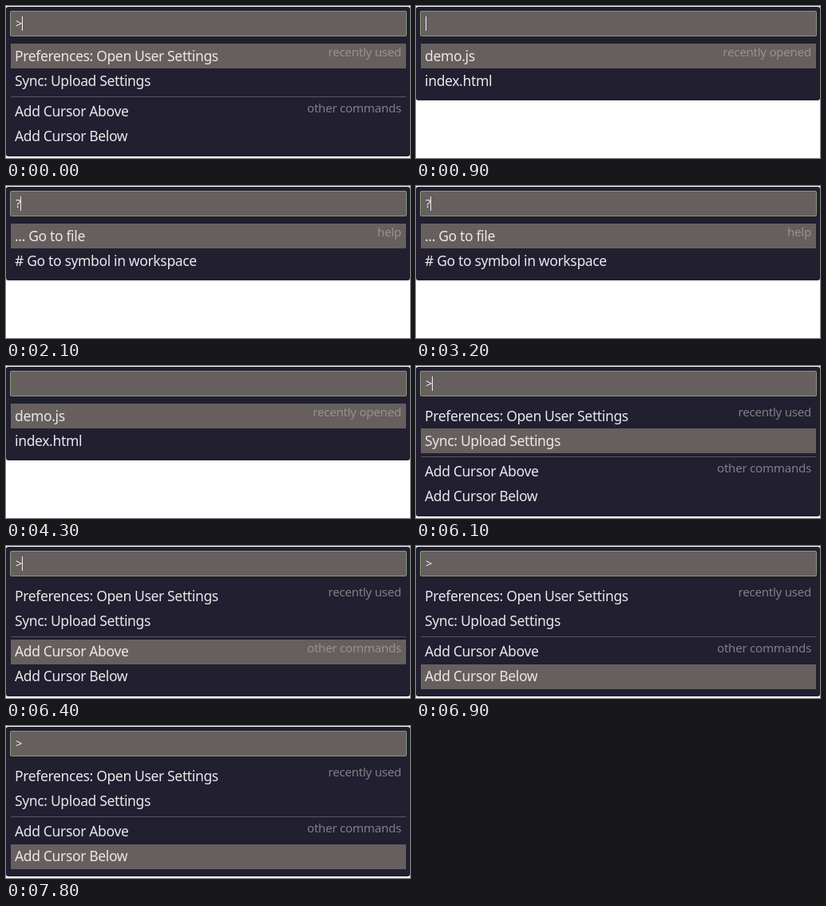
Animation, 506 px wide and 190 px high, one loop 8000 ms. Source, as an HTML page:

```html
<!DOCTYPE html>
<html lang="en">
<head>
<meta charset="utf-8">
<title>Command palette</title>
<style>
  html, body { margin: 0; width: 100%; height: 100%; overflow: hidden; background: #fff; }
  svg { display: block; font-family: "Noto Sans", "Open Sans", sans-serif; }
  .panel { fill: #211f30; }
  .input { fill: #665f5e; stroke: #879c75; }
  .caret, .typed { fill: #f0f0f0; }
  .typed { font-size: 14.6px; }
  .selected { fill: #665f5e; }
  .item { fill: #e8e8e8; font-size: 17.5px; letter-spacing: -.02em; }
  .group { fill: #a8a8a4; fill-opacity: .7; font-size: 15.2px; letter-spacing: -.02em; text-anchor: end; }
  .rule { fill: #57555f; }
</style>
</head>
<body>
<svg id="stage" width="506" height="190" viewBox="0 0 506 190"></svg>
<script>
const LOOP = 8000;
const ROW_TOPS = [47, 78, 117, 148];
const BASELINES = [69, 100, 138, 169];

const VIEWS = {
  commands: {
    typed: '>', caretX: 20, bottom: 188,
    items: ['Preferences: Open User Settings', 'Sync: Upload Settings', 'Add Cursor Above', 'Add Cursor Below'],
    groups: { 0: 'recently used', 2: 'other commands' }
  },
  files: {
    typed: '', caretX: 12, bottom: 118,
    items: ['demo.js', 'index.html'],
    groups: { 0: 'recently opened' }
  },
  help: {
    typed: '?', caretX: 18, bottom: 118,
    items: ['... Go to file', '# Go to symbol in workspace'],
    groups: { 0: 'help' }
  }
};

// Start time, view, selected row
const STEPS = [
  [0, 'commands', 0], [900, 'files', 0], [2100, 'help', 0], [3600, 'files', 0],
  [4800, 'commands', 0], [6100, 'commands', 1], [6400, 'commands', 2], [6900, 'commands', 3]
];

// Spans in which the caret is visible
const CARET_ON = [[0, 400], [900, 1600], [2100, 2700], [3200, 4300], [4800, 5400], [6100, 6700], [7200, 7800]];

const rect = (cls, x, y, w, h, rx = 0) =>
  `<rect class="${cls}" x="${x}" y="${y}" width="${w}" height="${h}" rx="${rx}"/>`;
const text = (cls, x, y, s) =>
  `<text class="${cls}" x="${x}" y="${y}">${s.replace('>', '&gt;')}</text>`;

function render(t) {
  const [, name, selected] = STEPS.findLast(step => step[0] <= t);
  const view = VIEWS[name];
  let out = rect('panel', 0, 1, 506, view.bottom - 1, 3)
    + rect('input', 5.5, 6.5, 496, 31, 1)
    + text('typed', 12, 27, view.typed)
    + rect('selected', 6, ROW_TOPS[selected], 495, 31);
  view.items.forEach((label, i) => {
    out += text('item', 11, BASELINES[i], label);
    if (view.groups[i]) out += text('group', 495, ROW_TOPS[i] + 16, view.groups[i]);
  });
  if (view.items.length > 2) out += rect('rule', 6, 113, 495, 1);
  if (CARET_ON.some(([from, to]) => t >= from && t < to)) out += rect('caret', view.caretX, 13, 1, 18);
  return out;
}

const stage = document.getElementById('stage');
const start = performance.now();
let shown = '';

function tick() {
  const markup = render((performance.now() - start) % LOOP);
  if (markup !== shown) stage.innerHTML = shown = markup;
  requestAnimationFrame(tick);
}
tick();
</script>
</body>
</html>
```
